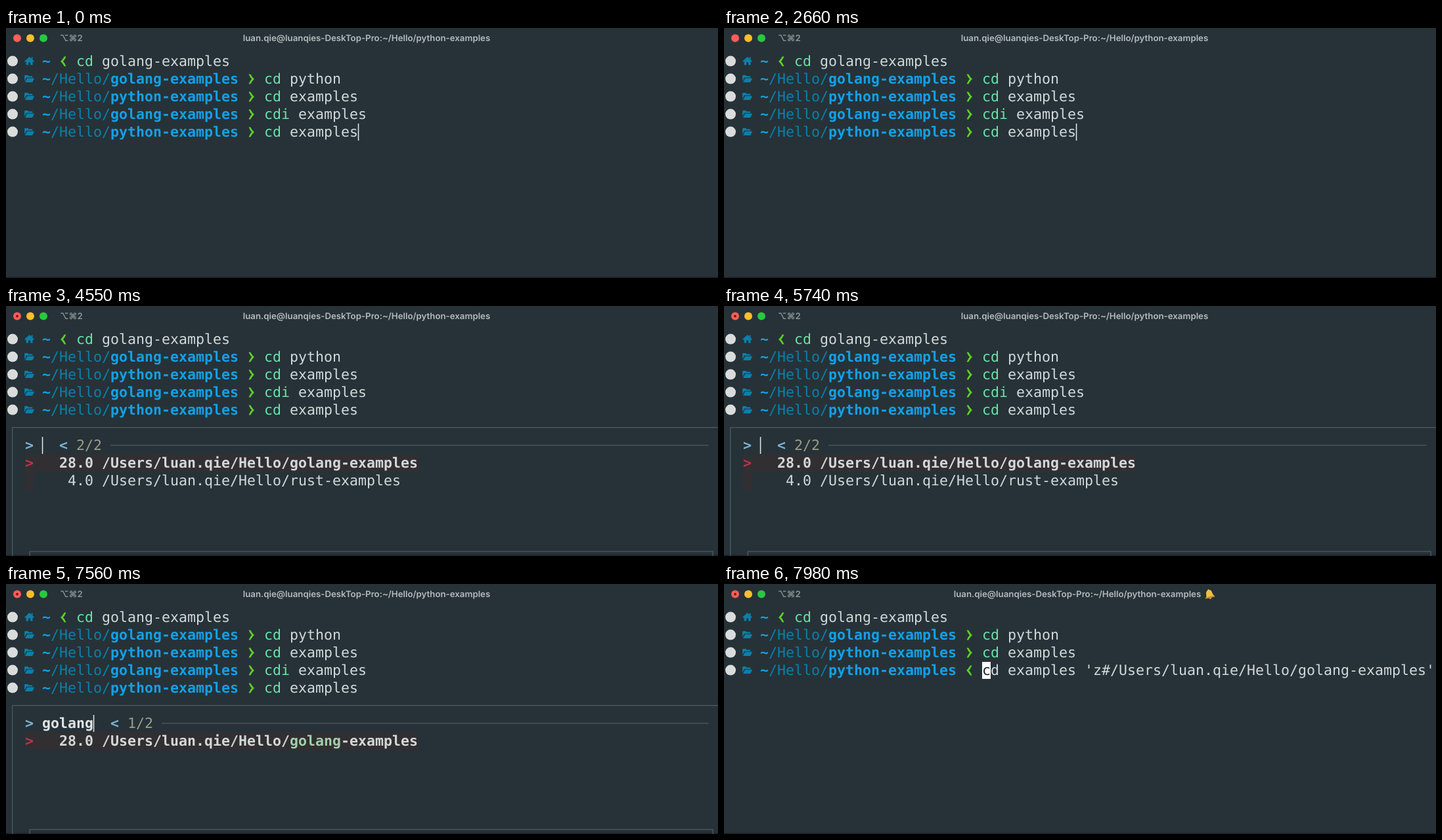
These frames come from a looping animation (1084 px wide and 382 px high, 8000 ms). An HTML page:

```html
<!DOCTYPE html>
<html lang="en">
<head>
<meta charset="utf-8">
<title>Terminal directory jump</title>
<style>
  html, body { margin: 0; width: 100%; height: 100%; overflow: hidden; background: #263238; }
  svg { display: block; width: 1084px; height: 382px; }
  text { white-space: pre; text-rendering: geometricPrecision; }
  .mono { font: 21.6px "DejaVu Sans Mono", monospace; font-variant-ligatures: none; }
  .bold { font-weight: 700; }
  .bar { font: 600 13.25px Inter, "DejaVu Sans", sans-serif; }
  .rule { fill: none; stroke: #4d5c61; stroke-width: 1.3; }
</style>
</head>
<body>
<svg id="stage" viewBox="0 0 1084 382" xmlns="http://www.w3.org/2000/svg"></svg>
<script>
const LOOP = 8000, CELL = 13, LINE = 27, LEFT = 3, TOP = 38, BASELINE = 20;
const USER = 'luan.qie', HOST = 'luanqies-DeskTop-Pro';
const TITLE = `${USER}@${HOST}:~/Hello/python-examples`;
const GO_DIR = `/Users/${USER}/Hello/golang-examples`;
const RUST_DIR = `/Users/${USER}/Hello/rust-examples`;
const C = {
  bg: '#263238', text: '#d2d8d9', bright: '#e2e4e4', selected: '#d4d7d7', command: '#6be3a8',
  path: '#0b80aa', anchor: '#14a0e6', arrow: '#5fce28', logo: '#dadcdc',
  prompt: '#7db2d0', info: '#9d9d86', pointer: '#bb3350', match: '#a3cfab', row: '#312f31'
};

// Start time, mode, query
const steps = [
  [0, 'edit', ''], [3500, 'pick', ''],
  [6510, 'pick', 'g'], [6580, 'pick', 'go'], [6650, 'pick', 'gol'],
  [6860, 'pick', 'gola'], [6930, 'pick', 'golan'], [7000, 'pick', 'golang'],
  [7700, 'done', '']
];

const colX = col => LEFT + col * CELL;
const rowY = row => TOP + row * LINE;
const rect = (x, y, w, h, fill) => `<rect x="${x}" y="${y}" width="${w}" height="${h}" fill="${fill}"/>`;
const dot = (x, y, r, fill) => `<circle cx="${x}" cy="${y}" r="${r}" fill="${fill}"/>`;
const rule = d => `<path class="rule" d="${d}"/>`;
const put = (row, col, str, fill, bold = false) => {
  const safe = str.replace(/&/g, '&amp;').replace(/</g, '&lt;').replace(/>/g, '&gt;');
  return `<text class="mono${bold ? ' bold' : ''}" x="${colX(col)}" y="${rowY(row) + BASELINE}" fill="${fill}">${safe}</text>`;
};
const caret = (row, col) => rect(colX(col) - 0.2, rowY(row), 1.5, 26, '#e6eaea');

function chevron(row, col, flip) {
  const x = colX(col) + 6.5, y = rowY(row) + 13;
  return `<path transform="translate(${x} ${y}) scale(${flip ? -1 : 1} 1)" fill="${C.arrow}"
    d="M-4-7.5H-1.3Q1.2-3 4.4 0Q1.2 3-1.3 7.5H-4Q-2.3 3 .5 0Q-2.3-3-4-7.5Z"/>`;
}

function icon(row, home) {
  const d = home
    ? 'M0-6.6L7.4.2L6.3 1.5L5 .4V6H1.5V2H-1.5V6H-5V.4L-6.3 1.5L-7.4.2ZM3-6H5V-2.2L3-4Z'
    : 'M-7.5 3.8V-4.4Q-7.5-5.6-6.3-5.6H-2.6L-1-4H3.7Q4.8-4 4.8-2.8V-1.8H-3.6Q-4.6-1.8-5.2-.8ZM-6.6 5.4L-3.9-.2Q-3.6-.8-2.9-.8H7.6L5 4.6Q4.6 5.4 3.8 5.4Z';
  return `<path transform="translate(35.6 ${rowY(row) + 12.6})" fill="${C.path}" d="${d}"/>`;
}

function promptLine(row, dir, flip) {
  const head = dot(10, rowY(row) + 12.6, 8, C.logo) + icon(row, !dir) + put(row, 4, '~', C.anchor, true);
  if (!dir) return head + chevron(row, 6, flip);
  return head + put(row, 5, '/Hello/', C.path) + put(row, 12, dir, C.anchor, true) + chevron(row, 28, flip);
}

const command = (row, col, name, arg) =>
  put(row, col, name, C.command) + put(row, col + name.length + 1, arg, C.text);

function bell() {
  return `<g transform="translate(739 15.5) rotate(-14)">
    ${dot(0, 6, 2, '#b9862a')}
    <path fill="#f0bd45" d="M0-7.6Q1.2-7.6 1.2-6.3Q4.5-5.3 4.7-1Q4.8 2.5 7 4.6V5.5H-7V4.6Q-4.8 2.5-4.7-1Q-4.5-5.3-1.2-6.3Q-1.2-7.6 0-7.6Z"/>
    <path fill="#c98f2c" d="M-6.2 3.6H6.2L7 5.5H-7Z"/></g>`;
}

function titleBar(edited, ringing) {
  return dot(17, 15.5, 6, '#fe5f57') + dot(37, 15.5, 6, '#febc2e') + dot(57, 15.5, 6, '#28c840') +
    (edited ? dot(17, 15.5, 2, '#7d1512') : '') +
    `<text class="bar" x="82" y="20" fill="#8f979a">⌥⌘2</text>` +
    `<text class="bar" x="${ringing ? 538 : 549}" y="20" text-anchor="middle" fill="#b6bbbd">${TITLE}</text>` +
    (ringing ? bell() : '');
}

function picker(query) {
  const n = query.length, mid = rowY(6) + 13.5, nameCol = 11 + GO_DIR.indexOf('golang');
  let out = rule('M9.8 382V185.7H1084') + rule('M36.2 382V375.2H1076.2V382') +
    rule(`M${colX(12 + n)} ${mid - 0.7}H1069.5`) +
    put(6, 2, '>', C.prompt, true) + put(6, 4, query, C.bright, true) + caret(6, 4 + n) +
    put(6, 6 + n, '<', C.prompt, true) + put(6, 8 + n, n ? '1/2' : '2/2', C.info) +
    rect(colX(2), rowY(7), CELL * 46, LINE, C.row) +
    put(7, 2, '>', C.pointer, true) + put(7, 6, '28.0 ' + GO_DIR.slice(0, nameCol - 11), C.selected, true) +
    put(7, nameCol, query, C.match, true) +
    put(7, nameCol + n, 'golang-examples'.slice(n), C.selected, true);
  if (!n) out += rect(colX(2), rowY(8), CELL, LINE, C.row) + put(8, 7, '4.0 ' + RUST_DIR, C.text);
  return out;
}

function scene(mode, query, edited) {
  let out = rect(0, 0, 1084, 382, C.bg) + rect(0, 380.5, 1084, 1.5, '#1b2227') +
    titleBar(edited, mode === 'done') +
    promptLine(0, '', true) + command(0, 8, 'cd', 'golang-examples') +
    promptLine(1, 'golang-examples') + command(1, 30, 'cd', 'python') +
    promptLine(2, 'python-examples') + command(2, 30, 'cd', 'examples');
  if (mode === 'done') {
    return out + promptLine(3, 'python-examples', true) +
      rect(colX(30), rowY(3), CELL, 26, '#fff') + put(3, 30, 'c', '#1d2428') +
      put(3, 31, `d examples 'z#${GO_DIR}'`, C.text);
  }
  out += promptLine(3, 'golang-examples') + command(3, 30, 'cdi', 'examples') +
    promptLine(4, 'python-examples') + command(4, 30, 'cd', 'examples');
  return out + (mode === 'pick' ? picker(query) : caret(4, 41));
}

const stage = document.getElementById('stage');
const start = performance.now();
let shown = '';

function draw() {
  const t = (performance.now() - start) % LOOP;
  const [, mode, query] = steps.filter(([at]) => at <= t).pop();
  const edited = t >= 4200;
  const key = mode + query + edited;
  if (key !== shown) {
    shown = key;
    stage.innerHTML = scene(mode, query, edited);
  }
  requestAnimationFrame(draw);
}
draw();
</script>
</body>
</html>
```
